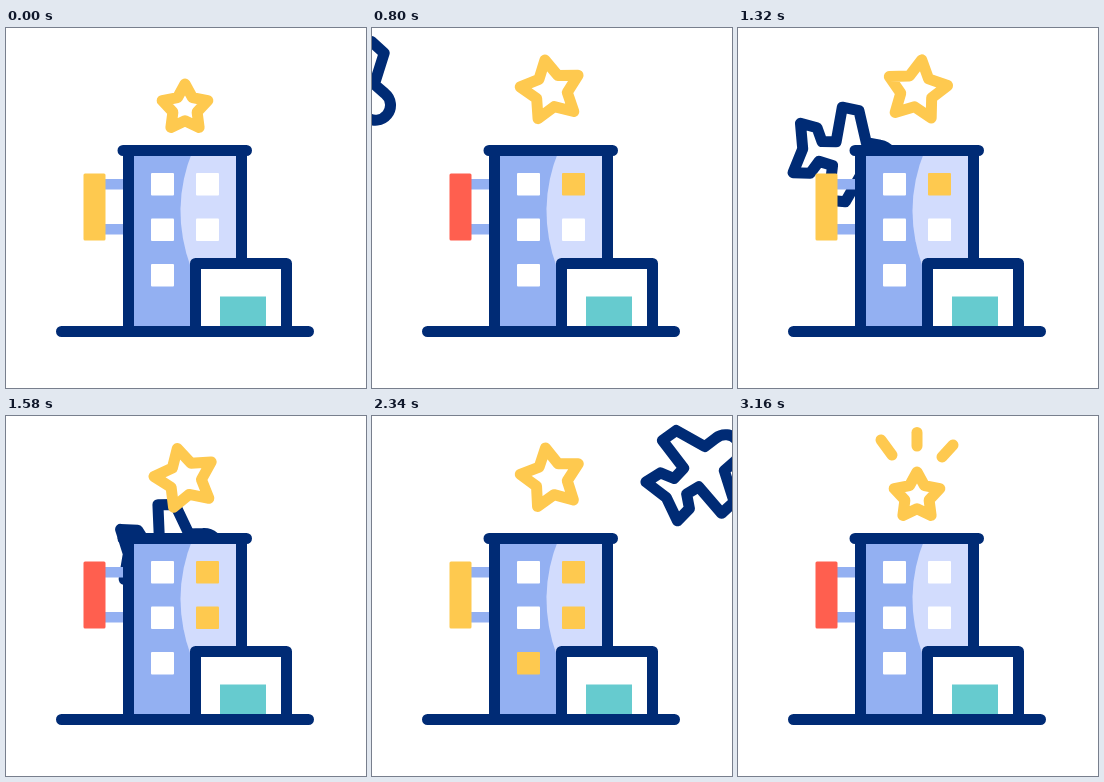
Recreate the animation shown at these times as an HTML page. Size 360 by 360 pixels, loop 3180 ms.

```html
<!DOCTYPE html>
<html lang="en">
<head>
<meta charset="utf-8">
<title>Hotel</title>
<style>
  html, body { margin: 0; width: 100%; height: 100%; overflow: hidden; background: #fff; }
  svg { display: block; width: 100vw; height: 100vh; }
  .line { fill: none; stroke: #002b75; stroke-width: 11; stroke-linecap: round; stroke-linejoin: round; }
  .gold { fill: none; stroke: #fec94f; stroke-width: 11; stroke-linecap: round; stroke-linejoin: round; }
  .blue { fill: #93b0f2; }
  .pale { fill: #d2dcfd; }
  .white { fill: #fff; }
  .teal { fill: #66cbcf; }
</style>
</head>
<body>
<svg viewBox="0 0 360 360">
  <path id="plane" class="line"/>
  <path class="blue" d="M99 151h20v10.5h-20zM99 196h20v10.5h-20z"/>
  <rect id="sign" x="77.5" y="145.5" width="22" height="67" rx="1.5"/>
  <path class="blue" d="M122 122H236V303H122z"/>
  <path class="pale" d="M187 122Q163 180 185 240H236V122z"/>
  <g id="windows"></g>
  <path class="white" d="M189.500 235.500H280.500V303H189.500z"/>
  <rect class="teal" x="214" y="268.500" width="46" height="31"/>
  <path class="line" d="M117 122.500H240.500M122.500 122.500V303M235.500 122.500V235M189.500 303V235.500H280.500V303M55.500 303.500H302.500"/>
  <g id="rays"></g>
  <path id="star" class="gold"/>
</svg>
<script>
const LOOP = 3180;
const GOLD = '#fec94f', RED = '#ff5f4f';
const $ = id => document.getElementById(id);

function add(parent, tag, attrs) {
  const el = document.createElementNS('http://www.w3.org/2000/svg', tag);
  for (const k in attrs) el.setAttribute(k, attrs[k]);
  return parent.appendChild(el);
}

const clamp = v => Math.max(0, Math.min(1, v));
const ramp = (t, a, b) => clamp((t - a) / (b - a));
const smooth = v => v * v * (3 - 2 * v);
const mix = (a, b, k) => a + (b - a) * k;

// Windows: x, y, time the light goes on
const LIGHTS_OFF = 2900;
const windows = [
  [145, 145], [145, 190.5], [145, 236, 2200],
  [190, 145, 620], [190, 190.5, 1340]
].map(([x, y, on = Infinity]) => ({
  on, el: add($('windows'), 'rect', { x, y, width: 23, height: 22.5, rx: 1 })
}));

// Rays: inner end, outer end
const rays = [
  [154, 39, 143, 24], [179, 30, 179, 16.5], [204, 41, 215, 29]
].map(ends => ({ ends, el: add($('rays'), 'line', { class: 'gold' }) }));

// Plane outline: upper half from nose to tail, mirrored for the lower half
const half = [[35, -15], [21, -15.5], [9, -46], [-8, -47], [-9, -12], [-23, -10], [-30, -23], [-47, -25]];
const lower = half.map(([x, y]) => [x, -y]).reverse();
$('plane').setAttribute('d', `M${half.join('L')}L-41 0L${lower.join('L')}A15 15 0 0 0 35 -15Z`);

// Flight: time, x, y, heading
const flight = [
  [700, -55, 30, 45], [800, -24, 55, 39], [1100, 54, 108, 20], [1580, 163, 135, -4],
  [2080, 272, 101, -27], [2340, 326, 56, -39], [2640, 392, -6, -52]
];

function slope(i, c) {
  const a = flight[Math.max(0, i - 1)], b = flight[Math.min(flight.length - 1, i + 1)];
  return (b[c] - a[c]) / (b[0] - a[0]);
}

function along(t, c) {
  let i = 0;
  while (i < flight.length - 2 && t > flight[i + 1][0]) i++;
  const a = flight[i], b = flight[i + 1], d = b[0] - a[0];
  const u = (t - a[0]) / d, v = 1 - u;
  return v * v * (1 + 2 * u) * a[c] + u * u * (3 - 2 * u) * b[c]
    + d * u * v * (v * slope(i, c) - u * slope(i + 1, c));
}

function starPath(cx, cy, r, turn) {
  const pts = [];
  for (let i = 0; i < 10; i++) {
    const a = (i * 36 + turn - 90) * Math.PI / 180, q = i % 2 ? r * 0.53 : r;
    pts.push((cx + q * Math.cos(a)).toFixed(2) + ' ' + (cy + q * Math.sin(a)).toFixed(2));
  }
  return 'M' + pts.join('L') + 'Z';
}

function draw(t) {
  const flying = t > 700 && t < 2640;
  $('plane').style.display = flying ? '' : 'none';
  if (flying) {
    $('plane').setAttribute('transform', `translate(${along(t, 1)} ${along(t, 2)}) rotate(${along(t, 3)})`);
  }

  const blink = Math.floor((t + 40) / 540);
  $('sign').setAttribute('fill', blink % 2 ? RED : GOLD);

  for (const w of windows) {
    w.el.setAttribute('fill', t >= w.on && t < LIGHTS_OFF ? GOLD : '#fff');
  }

  const lift = smooth(ramp(t, 200, 520)) * (1 - smooth(ramp(t, 2800, 3020)));
  const sway = ramp(t, 200, 560) * (1 - ramp(t, 2400, 3000));
  const turn = -14.5 * sway * Math.cos((t - 1565) / 690 * 2 * Math.PI);
  $('star').setAttribute('d', starPath(179, mix(80, 62.5, lift), mix(24, 31, lift), turn));

  const burst = smooth(ramp(t, 2990, 3150));
  $('rays').style.display = burst > 0 ? '' : 'none';
  for (const { ends: [x1, y1, x2, y2], el } of rays) {
    el.setAttribute('x1', x1);
    el.setAttribute('y1', y1);
    el.setAttribute('x2', mix(x1, x2, burst));
    el.setAttribute('y2', mix(y1, y2, burst));
  }
}

const start = performance.now();
function tick() {
  draw((performance.now() - start) % LOOP);
  requestAnimationFrame(tick);
}
tick();
</script>
</body>
</html>
```
